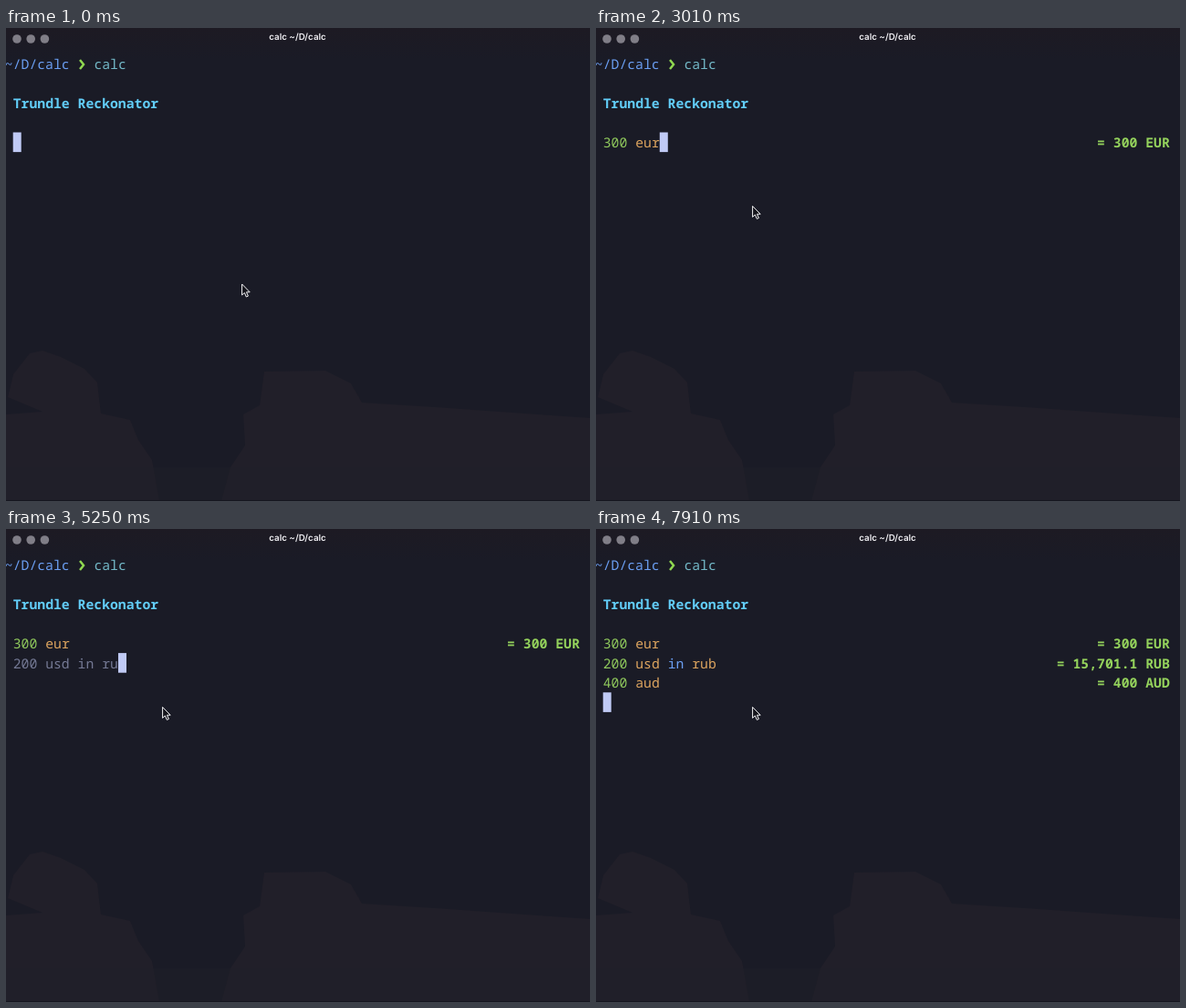
Recreate the animation shown at these times as an HTML page. Size 640 px wide and 519 px high, loop 8 s.

```html
<!DOCTYPE html>
<html lang="en">
<head>
<meta charset="utf-8">
<title>calc</title>
<style>
  html, body { margin: 0; width: 100%; height: 100%; overflow: hidden; background: #1a1b26; }
  svg { display: block; width: 640px; height: 519px; }
  text { font: 14.78px "Noto Sans Mono", monospace; white-space: pre; text-rendering: geometricPrecision; }
  .bar { font: 600 9.8px Inter, sans-serif; fill: #f0eff3; text-anchor: middle; }
  .bold { font-weight: 600; }
  .result { font-weight: 600; fill: #94d25c; text-anchor: end; }
</style>
</head>
<body>
<svg viewBox="0 0 640 519">
  <defs>
    <linearGradient id="top" x2="0" y2="1">
      <stop stop-color="#1d1a23"/>
      <stop offset="1" stop-color="#1a1b26"/>
    </linearGradient>
  </defs>
  <rect width="640" height="519" fill="#1a1b26"/>
  <rect width="640" height="34" fill="url(#top)"/>
  <g fill="#211f29">
    <path d="M2 405 8 380 26 357 40 354 60 361 86 374 100 389 104 423 136 430 145 452 160 474 168 519H0V424L40 421Z"/>
    <path d="M283 377 350 376 378 390 390 411 470 416 640 428V519H236L246 482 262 458 260 424 278 414Z"/>
    <path d="M0 482H640V519H0Z" opacity=".45"/>
  </g>
  <path d="M0 518.5H640" stroke="#14151e"/>
  <g fill="#807e87">
    <circle cx="12" cy="12" r="4.8"/>
    <circle cx="27.2" cy="12" r="4.8"/>
    <circle cx="42.4" cy="12" r="4.8"/>
  </g>
  <text class="bar" x="319.5" y="13.4">calc ~/D/calc</text>
  <text x="-1.2" y="45" fill="#6b9ff3">~/D/calc</text>
  <path d="M81 35 85 40 81 45" fill="none" stroke="#90d850" stroke-width="2.5"/>
  <text x="96.4" y="45" fill="#73b9c8">calc</text>
  <text class="bold" x="7.7" y="88" fill="#62cdf8">Trundle Reckonator</text>
  <g id="rows"></g>
  <rect id="caret" width="9" height="21.6" fill="#c0caf5"/>
  <path id="mouse" d="M0 0V12L2.8 9.5 4.7 14 6.8 13.1 4.9 8.8H8.6Z" fill="#15151c" stroke="#f4f4f6"/>
</svg>
<script>
const LOOP = 8000, STEP = 70, CELL = 8.868, LEFT = 7.7, PITCH = 21.6;
const GREEN = '#8fc85c', ORANGE = '#dca45f', BLUE = '#6b9ff3', GRAY = '#747994';

// keys: when each character is typed; enter: when the line is closed
const lines = [
  { text: '300 eur', enter: 3150,
    keys: [2030, 2240, 2380, 2590, 2730, 2870, 2940] },
  { text: '200 usd in rub', enter: 5670,
    keys: [3500, 3570, 3710, 3850, 4060, 4200, 4340, 4620, 4690, 4830, 5040, 5110, 5250, 5460] },
  { text: '400 aud', enter: 7910,
    keys: [6230, 6300, 6440, 6650, 7000, 7280, 7420] }
];

const $ = id => document.getElementById(id);
const typed = (line, t) => line.text.slice(0, line.keys.filter(k => k <= t).length);
const valid = s => /^\d+ ?((eur|usd|aud) ?( in rub)?)?$/.test(s);

function answer(s) {
  if (!s || !valid(s)) return '';
  return s.endsWith('in rub') ? '= 15,701.1 RUB' : '= ' + s.trim().toUpperCase();
}

function colour(word) {
  return /\d/.test(word) ? GREEN : word === 'in' ? BLUE : ORANGE;
}

function paint(s) {
  if (!valid(s)) return `<tspan fill="${GRAY}">${s}</tspan>`;
  return s.replace(/\S+/g, w => `<tspan fill="${colour(w)}">${w}</tspan>`);
}

function row(line, i, t) {
  const s = typed(line, t), y = 131 + i * PITCH;
  const result = valid(s) ? answer(typed(line, t - STEP)) : '';
  return `<text x="${LEFT}" y="${y}">${paint(s)}</text>` +
    `<text class="result" x="628.8" y="${y}">${result}</text>`;
}

let shown = '';
function draw(now) {
  const t = now % LOOP;
  const html = lines.map((line, i) => row(line, i, t)).join('');
  if (html !== shown) $('rows').innerHTML = shown = html;

  const at = lines.filter(l => l.enter <= t).length;
  const col = at < lines.length ? typed(lines[at], t).length : 0;
  $('caret').setAttribute('x', LEFT + col * CELL);
  $('caret').setAttribute('y', 114.5 + at * PITCH);

  const p = Math.min(1, Math.max(0, (Math.floor(t / STEP) - 4) / 6));
  const e = p * p * (3 - 2 * p);
  $('mouse').setAttribute('transform', `translate(${258.6 - 87 * e} ${281 - 85.6 * e})`);
  requestAnimationFrame(draw);
}
requestAnimationFrame(draw);
</script>
</body>
</html>
```
